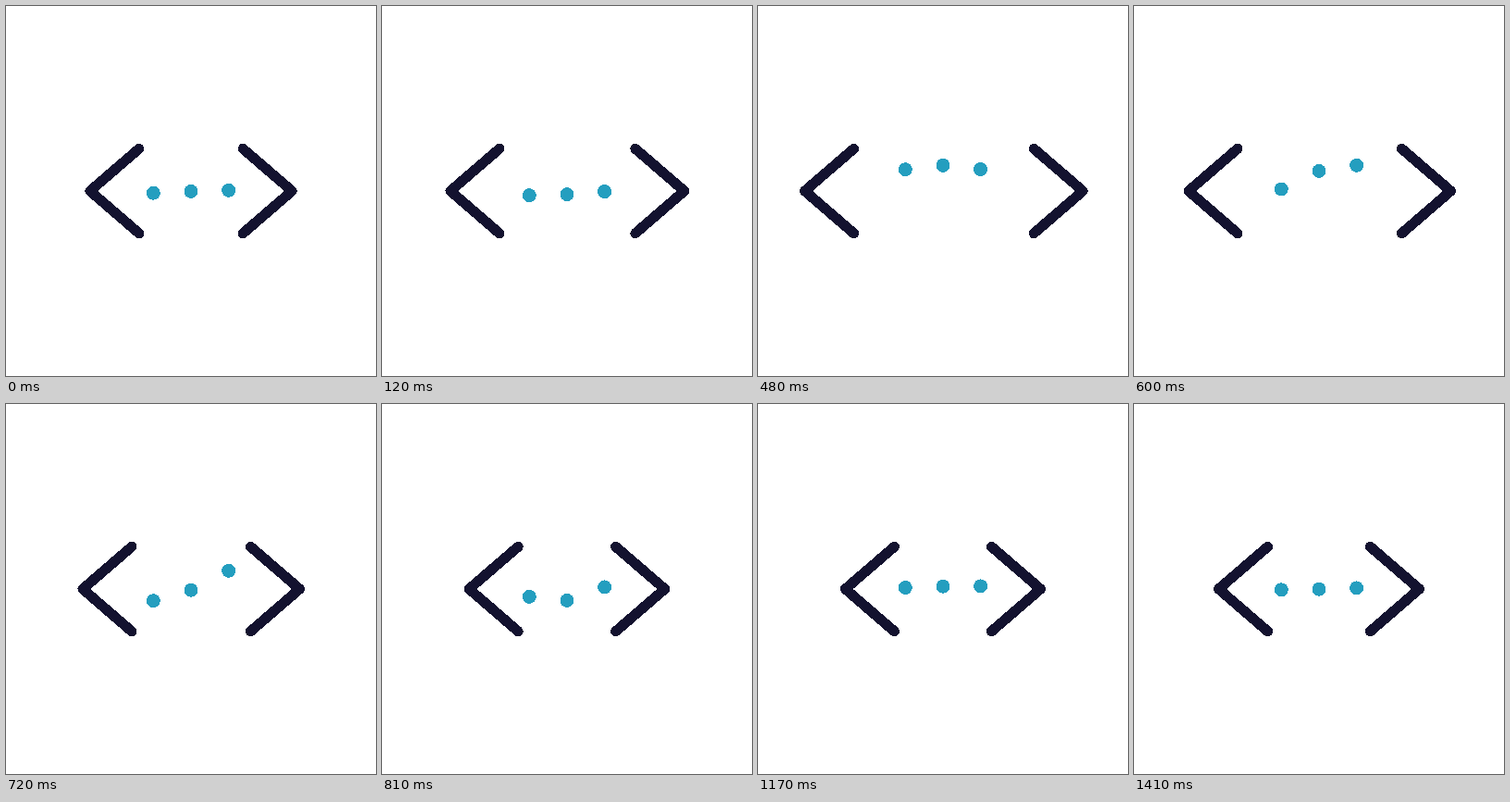
Recreate the animation shown at these times as an HTML page. Size 400 px wide and 400 px high, loop 1.44 s.

```html
<!DOCTYPE html>
<html>
<head>
<meta charset="utf-8">
<style>
  html, body { margin: 0; width: 100%; height: 100%; overflow: hidden; background: #fff; }
  svg { display: block; width: 100%; height: 100%; shape-rendering: crispEdges; }
  path { fill: none; stroke: #13122f; stroke-width: 11; stroke-linecap: round; stroke-linejoin: round; }
  circle { fill: #249ebf; }
</style>
</head>
<body>
<svg viewBox="0 0 400 400">
  <path id="left" d="M144 154.3 91 200 144 245.8"/>
  <path id="right" d="M256 154.3 309 200 256 245.8"/>
  <circle cx="159.3" cy="200.8" r="7.5"/>
  <circle cx="200" cy="200.8" r="7.5"/>
  <circle cx="240.6" cy="200.8" r="7.5"/>
</svg>
<script>
const LOOP = 1440, STEP = 30, DELAY = 105;

// Turning points; "out" and "into" shape the easing towards the next one
const spread = [
  { at: -40, value: -0.6, out: 0.45, into: 0.36 },
  { at: 370, value: 42, out: 0.7, into: 0.43 },
  { at: 930, value: -6.4 },
];
const hop = [
  { at: -30, value: 0 },
  { at: 60, value: 5.5, out: 0.57, into: 0.29 },
  { at: 380, value: -28.5, out: 0.56, into: 0.62 },
  { at: 725, value: 12 },
  { at: 970, value: -4 },
];

// cubic-bezier(out, 0, into, 1), solved by bisection
function ease(x, out, into) {
  let low = 0, high = 1, s;
  for (let i = 0; i < 24; i++) {
    s = (low + high) / 2;
    const r = 1 - s;
    if (3 * r * r * s * out + 3 * r * s * s * into + s * s * s < x) low = s;
    else high = s;
  }
  return s * s * (3 - 2 * s);
}

function valueAt(keys, time) {
  const start = keys[0].at;
  const t = start + (time - start + LOOP) % LOOP;
  const i = keys.findLastIndex(key => key.at <= t);
  const { at, value, out = 1 / 3, into = 2 / 3 } = keys[i];
  const next = keys[i + 1] || { at: start + LOOP, value: keys[0].value };
  return value + (next.value - value) * ease((t - at) / (next.at - at), out, into);
}

const left = document.getElementById('left');
const right = document.getElementById('right');
const dots = document.querySelectorAll('circle');
const move = (el, x, y) => el.setAttribute('transform', `translate(${x} ${y})`);

function draw() {
  const t = Math.floor(performance.now() % LOOP / STEP) * STEP;
  const d = valueAt(spread, t);
  move(left, -d, 0);
  move(right, d * 1.045, 0);
  dots.forEach((dot, i) => move(dot, 0, valueAt(hop, t - i * DELAY)));
  requestAnimationFrame(draw);
}
draw();
</script>
</body>
</html>
```
